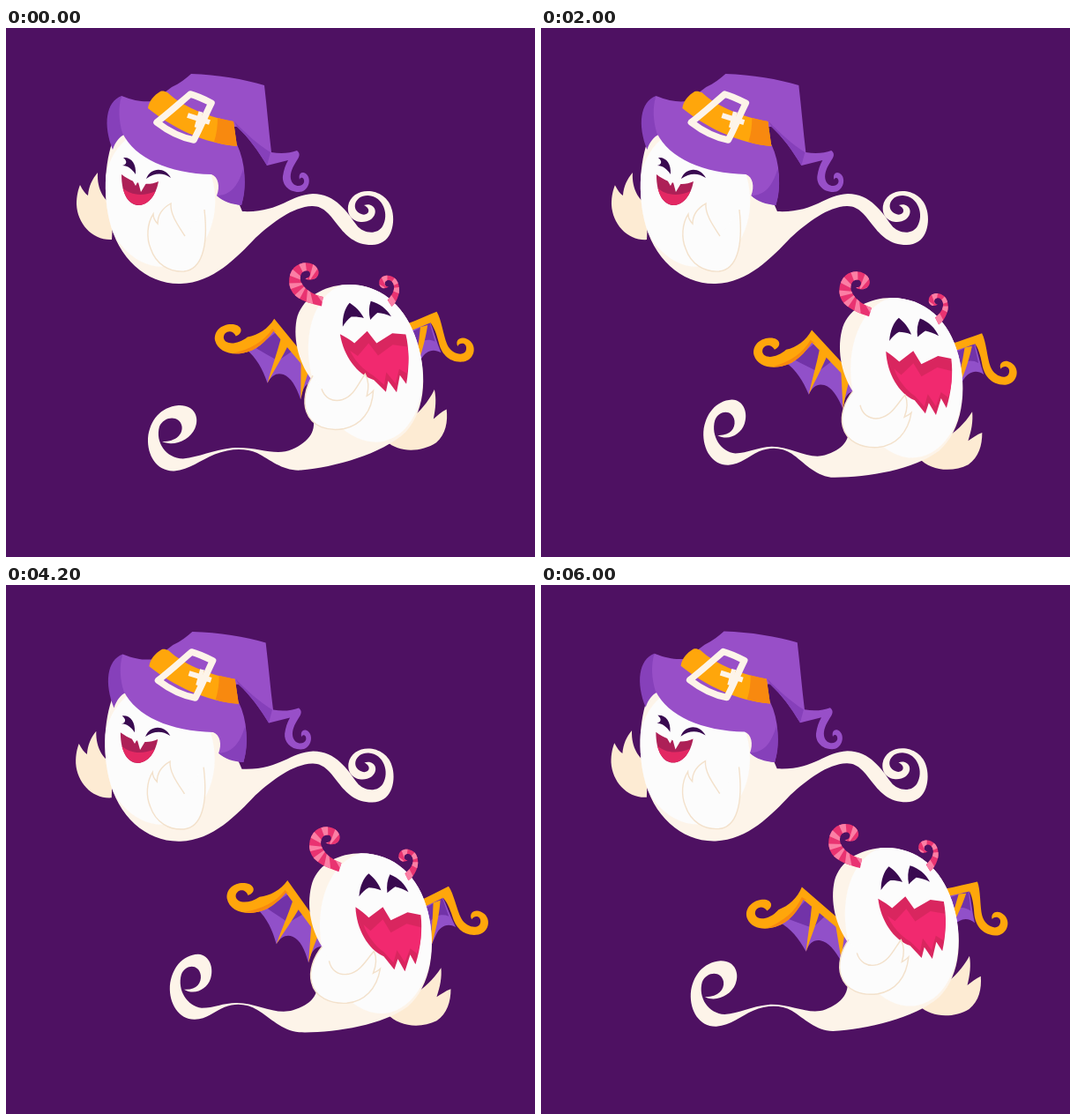
Write an HTML page with a canvas that moves like this. It is 600 px wide and 600 px high and loops after 6.1 s.

```html
<!DOCTYPE html>
<html lang="en">
<head>
<meta charset="utf-8">
<title>Halloween ghosts</title>
<style>
html, body { margin: 0; width: 100%; height: 100%; overflow: hidden; background: #4e1162; }
canvas { display: block; width: 600px; height: 600px; }
</style>
</head>
<body>
<canvas id="stage" width="600" height="600"></canvas>
<script>
const ctx = document.getElementById('stage').getContext('2d');
const LOOP = 6100, STEP = 100, TAU = Math.PI * 2;
const C = {
  night: '#4e1162', white: '#fcfcfc', cream: '#fdf4e9', hand: '#fdebd3', line: '#f3e1cb',
  hat: '#984fc8', hatDark: '#8640ba', gold: '#ffa60b', goldDark: '#f8890f', eye: '#390a50',
  mouth: '#ad2057', tongue: '#e32863', jaw: '#d9265f', throat: '#f1296f',
  horn: '#e93371', stripe: '#fb7fa5', wing: '#9150c9', wingDark: '#7233a8'
};

const smooth = (a, b, x) => {
  const k = Math.min(1, Math.max(0, (x - a) / (b - a)));
  return k * k * (3 - 2 * k);
};

// Builds a path, moving every point with an optional warp.
function shape(d, warp) {
  return new Path2D(warp ? d.replace(/(-?[\d.]+),(-?[\d.]+)/g, (m, x, y) => warp(+x, +y).join(',')) : d);
}
function fill(d, color, warp) {
  ctx.fillStyle = color;
  ctx.fill(shape(d, warp));
}
function stroke(d, color, width) {
  ctx.strokeStyle = color;
  ctx.lineWidth = width;
  ctx.stroke(shape(d));
}
function blob(x, y, rx, ry, angle, color) {
  ctx.fillStyle = color;
  ctx.beginPath();
  ctx.ellipse(x, y, rx, ry, angle, 0, TAU);
  ctx.fill();
}

// A pose moves, turns and scales its parts around a pivot.
const place = (x, y, dx, dy, turn = 0, sx = 1, sy = 1) => ({ x, y, dx, dy, turn, sx, sy });
function group(pose, draw) {
  ctx.save();
  ctx.translate(pose.x + pose.dx, pose.y + pose.dy);
  ctx.rotate(pose.turn);
  ctx.scale(pose.sx, pose.sy);
  ctx.translate(-pose.x, -pose.y);
  draw();
  ctx.restore();
}
function move(p, x, y) {
  const c = Math.cos(p.turn), s = Math.sin(p.turn), u = x - p.x, v = y - p.y;
  return [p.x + p.dx + u * c - v * s, p.y + p.dy + u * s + v * c];
}
function clipped(path, draw) {
  ctx.save();
  ctx.clip(path);
  draw();
  ctx.restore();
}

const WITCH = {
  body: 'M128,112 C113,140 109,180 117,217 C127,262 160,291 198,290 C235,289 262,260 283,238 ' +
    'C303,220 325,203 347,202 C374,201 376,246 415,246 C436,246 442,224 438,207 ' +
    'C432,179 392,178 388,202 C386,219 404,224 414,217 C424,209 417,197 406,201 ' +
    'C416,206 410,214 403,211 C390,206 396,189 411,190 C428,191 435,212 427,225 ' +
    'C420,236 404,232 398,224 C387,209 374,188 348,188 C322,189 310,210 268,208 L230,120 Z',
  hand: 'M120,240 C98,241 81,222 80,200 C80,190 82,183 84,178 C87,184 90,188 93,190 C94,179 98,171 104,164 C103,184 112,196 122,202 Z',
  brim: 'M131,77 C146,83 156,84 166,83 L262,132 C272,153 273,180 267,201 C256,199 246,196 239,190 ' +
    'C243,180 241,169 233,166 C185,165 146,148 132,119 C128,105 127,91 131,77 Z',
  under: 'M131,77 C113,84 110,110 121,138 C124,129 129,123 134,121 C130,107 129,92 131,77 Z',
  flap: 'M239,190 C246,197 256,200 267,201 C271,189 272,174 269,160 C263,180 254,190 239,190 Z',
  cone: 'M176,76 L188,67 C197,63 204,57 210,52 C240,53 270,58 293,65 C296,91 298,116 301,141 ' +
    'C312,143 322,142 330,139 C334,142 333,146 330,150 C325,158 322,164 323,171 C325,181 336,181 338,175 ' +
    'C339,170 334,168 333,172 C331,164 337,162 341,166 C347,172 343,186 332,186 C320,186 313,177 314,168 ' +
    'C315,161 317,155 320,150 L296,156 C286,139 275,124 262,112 L250,112 Z',
  band: 'M175,72 C168,76 162,83 161,91 C188,113 225,131 262,134 L258,106 C234,102 202,91 183,73 C180,72 178,71 175,72 Z',
  bandEnd: 'M240,102 L258,106 L262,134 C253,133 244,132 236,129 C239,120 240,111 240,102 Z',
  mouth: 'M131,166 C131,190 140,202 152,201 C165,199 171,185 173,174 C160,180 144,176 131,166 Z',
  tongue: 'M132,181 C140,189 154,192 170,185 C166,196 160,201 152,201 C141,201 134,192 132,181 Z',
  arm: 'M203,236 C196,225 186,212 187,199 C178,204 172,212 172,222 C169,219 167,215 167,211 ' +
    'C160,222 159,238 164,250 C170,268 185,277 202,276 C221,274 230,250 225,206'
};

function drawHat(bend) {
  fill(WITCH.under, C.hatDark);
  fill(WITCH.brim, C.hat, bend);
  fill(WITCH.flap, C.hatDark, bend);
  fill(WITCH.cone, C.hat);
  fill('M262,112 C275,124 286,139 296,156 L300,141 C286,132 272,120 259,106 Z', C.hatDark);
  fill(WITCH.band, C.gold);
  fill(WITCH.bandEnd, C.goldDark);
  ctx.lineJoin = 'round';
  stroke('M209,75 C217,77 225,81 233,85 C226,99 220,114 213,127 C197,124 184,117 171,107 C184,97 195,87 209,75 Z', C.cream, 7.5);
  stroke('M206,99 L231,107', C.cream, 6);
  stroke('M221,95 L216,113', C.cream, 5);
}

function drawWitch(t) {
  const phase = TAU * t / (LOOP / 3);
  const a = (1 - Math.cos(phase)) / 2, sway = Math.sin(phase);
  const pose = place(200, 150, -18 * a, 23 * a, -0.112 * a);
  const warp = (x, y) => {
    const [bx, by] = move(pose, x, y);
    const k = smooth(255, 370, x), sag = 5 * a * smooth(230, 280, y);
    return [bx + (x - 4 * a + 1.5 * sway - bx) * k, by - sag + (y + 12 * a - by + sag) * k];
  };
  const bend = (x, y) => {
    const k = a * smooth(230, 268, x) * smooth(145, 200, y);
    return [x + 3 * k, y - 16 * k];
  };
  group(pose, () => group(place(121, 234, 0, 0, -0.38 * a, 1 - 0.13 * a), () => fill(WITCH.hand, C.hand)));

  fill(WITCH.body, C.cream, warp);
  clipped(shape(WITCH.body, warp), () => group(pose, () => blob(174, 192, 63, 79, -0.12, C.white)));

  group(pose, () => {
    group(place(200, 265, 0, 0, -0.15 * a), () => {
      fill(WITCH.arm, C.white);
      stroke(WITCH.arm, C.line, 1.4);
    });
    group(place(131, 166, -11 * a, 0, 0, 1 + 0.16 * a, 1 - 0.18 * a), () => {
      fill('M133,147 C142,146 148,154 147,166 C143,160 138,156 132,156 C137,155 138,151 133,147 Z', C.eye);
      fill('M159,171 C164,158 180,157 187,170 C178,164 169,164 159,171 Z', C.eye);
      fill(WITCH.mouth, C.mouth);
      clipped(shape(WITCH.mouth), () => fill(WITCH.tongue, C.tongue));
      fill('M143,172 L149,175 L147,179 Z M150,175 L159,176 L153,186 Z', C.white);
    });
    group(place(200, 150, 3 * a + 6 * sway, 2.5 * a, 0, 1 + 0.06 * a), () => drawHat(bend));
  });
}

const IMP = {
  body: 'M402,304 C440,304 468,330 478,370 C488,410 482,455 455,478 C425,500 370,508 332,507 ' +
    'C312,505 300,491 285,482 C274,475 260,474 248,479 C236,484 228,493 214,493 ' +
    'C196,493 185,475 186,455 C188,435 200,420 218,419 C232,420 236,436 232,447 ' +
    'C228,459 214,466 202,459 C216,460 222,452 221,443 C219,430 204,430 199,442 ' +
    'C194,460 206,478 222,480 C236,480 246,474 262,474 C285,474 305,488 325,482 ' +
    'C345,476 356,465 352,445 C352,430 358,418 358,410 C344,388 340,360 347,337 C355,315 378,304 402,304 Z',
  hand: 'M432,486 C445,501 470,503 488,494 C500,486 504,472 504,458 C498,460 493,464 488,467 ' +
    'C492,455 494,445 493,434 C484,448 473,457 464,463 L445,470 Z',
  mouth: 'M396,365 C402,369 407,373 411,377 L427,365 L436,380 L455,371 L470,374 ' +
    'C472,390 470,411 464,430 L458,419 L452,438 L444,424 L440,436 L428,421 C410,413 397,390 396,365 Z',
  throat: 'M405,385 L413,392 L427,379 L436,394 L454,384 L470,388 C471,398 469,409 466,418 ' +
    'L458,412 L452,428 L443,414 L439,428 L428,416 C418,409 409,397 405,385 Z',
  hornL: 'M380,315 C369,311 360,304 357,295 C355,286 362,281 367,284 C370,287 368,292 362,292 ' +
    'C370,297 380,292 378,284 C375,273 360,271 351,278 C342,286 341,301 349,310 C357,318 366,321 377,325 Z',
  hornR: 'M452,327 C459,321 462,316 461,310 C460,305 455,303 452,306 C450,309 452,312 455,312 ' +
    'C449,316 444,311 445,306 C446,299 455,298 460,301 C468,305 468,317 465,323 C463,328 460,332 456,335 Z',
  arm: 'M358,410 C348,422 343,438 346,450 C350,468 368,475 386,474 C406,472 420,458 424,435 ' +
    'C421,438 418,439 416,440 C420,430 420,422 417,415 C408,425 402,438 388,441 C376,443 368,436 366,426',
  wingL: 'M285,366 C296,376 302,390 306,406 C312,397 318,395 325,398 C333,402 338,412 342,428 ' +
    'C345,415 350,408 361,410 L360,390 L320,342 Z',
  frameL: 'M320,334 C312,345 300,351 288,352 C276,360 262,359 261,351 C261,343 272,341 275,350 ' +
    'C285,347 283,337 271,336 C260,335 250,342 251,353 C253,365 266,371 280,370 C297,369 309,358 318,348 L352,396 L359,391 Z',
  ribsL: 'M326,356 L334,364 C325,379 315,392 306,406 C312,390 320,373 326,356 Z M346,386 L357,390 C351,402 346,415 342,428 Z',
  wingR: 'M473,364 L494,352 C500,364 504,376 510,387 C500,382 492,387 488,396 L482,410 L472,385 Z',
  frameR: 'M501,341 C507,349 511,368 516,377 C522,388 538,390 538,380 C538,373 530,373 528,378 ' +
    'C524,371 531,366 538,369 C551,374 549,392 536,395 C520,398 510,388 506,375 C503,366 499,358 495,354 ' +
    'L466,369 L468,358 C479,353 491,346 501,341 Z'
};

function drawHorn(d, x, y, radius) {
  fill(d, C.horn);
  clipped(shape(d), () => {
    ctx.setLineDash([6, 7]);
    ctx.strokeStyle = C.stripe;
    ctx.lineWidth = radius * 1.5;
    ctx.beginPath();
    ctx.arc(x, y, radius, 0, TAU);
    ctx.stroke();
    ctx.setLineDash([]);
  });
}

function drawImp(t) {
  const s = Math.cos(TAU * (t - 862) / (LOOP / 4));
  const flap = (1 - Math.cos(TAU * (t / (LOOP / 12) - 0.18))) * 0.15;
  const lean = ((0.34 - s) / 1.27) ** 2;
  const pose = place(410, 350, 13 * (s - 0.34), 2 - (s < 0 ? 18.6 : 12) * s * s, -0.12 * lean);
  const tail = [10 * s - 17 * s * s - 1.5, 8 * (0.34 - s)];
  const warp = (x, y) => {
    const [bx, by] = move(pose, x, y);
    const body = smooth(262, 340, x), curl = 1 - smooth(200, 290, x);
    return [x + (bx - x) * body + tail[0] * curl, y + (by - y) * body + tail[1] * curl];
  };
  const hinge = (x, y, turn) => {
    const [hx, hy] = move(pose, x, y);
    return place(x, y, hx - x, hy - y, turn);
  };

  group(hinge(356, 396, -flap), () => {
    fill(IMP.wingL, C.wing);
    fill('M296,365 L320,350 L338,372 L320,382 C312,376 304,371 296,365 Z', C.wingDark);
    fill(IMP.ribsL, C.gold);
    fill(IMP.frameL, C.gold);
    fill('M270,369 C290,366 306,359 317,345 L322,350 L318,348 C309,358 297,369 280,370 Z', C.goldDark);
  });
  group(hinge(476, 368, flap), () => {
    fill(IMP.wingR, C.wing);
    fill('M476,366 L494,354 L502,375 C494,372 487,374 480,382 Z', C.wingDark);
    fill('M484,360 L492,357 C491,375 487,394 482,412 C482,395 484,377 484,360 Z', C.gold);
    fill(IMP.frameR, C.gold);
  });
  group(pose, () => fill(IMP.hand, C.hand));

  fill(IMP.body, C.cream, warp);
  clipped(shape(IMP.body, warp), () => group(pose, () => blob(419, 394, 63, 92, -0.12, C.white)));

  group(pose, () => {
    drawHorn(IMP.hornL, 365, 297, 18);
    drawHorn(IMP.hornR, 453, 314, 12);
    group(place(0, 0, -2 * lean, -2 * lean), () => {
      fill('M400,353 C401,341 405,332 411,327 C417,332 422,338 425,346 C420,344 415,343 411,343 C407,345 403,349 400,353 Z', C.eye);
      fill('M432,349 C431,341 432,334 435,328 C445,332 452,339 456,348 C451,345 446,343 441,342 C438,344 435,346 432,349 Z', C.eye);
    });
    group(place(0, 0, -2 * lean, -6 * lean), () => {
      fill(IMP.mouth, C.jaw);
      fill(IMP.throat, C.throat);
    });
    group(place(0, 0, 0, -8 * lean), () => {
      fill(IMP.arm, C.white);
      stroke(IMP.arm, C.line, 1.4);
    });
  });
}

function frame(now) {
  const t = Math.floor((now % LOOP) / STEP) * STEP;
  ctx.fillStyle = C.night;
  ctx.fillRect(0, 0, 600, 600);
  drawWitch(t);
  drawImp(t);
}

let start;
function tick(now) {
  start ??= now;
  frame(now - start);
  requestAnimationFrame(tick);
}
frame(0);
requestAnimationFrame(tick);
</script>
</body>
</html>
```
